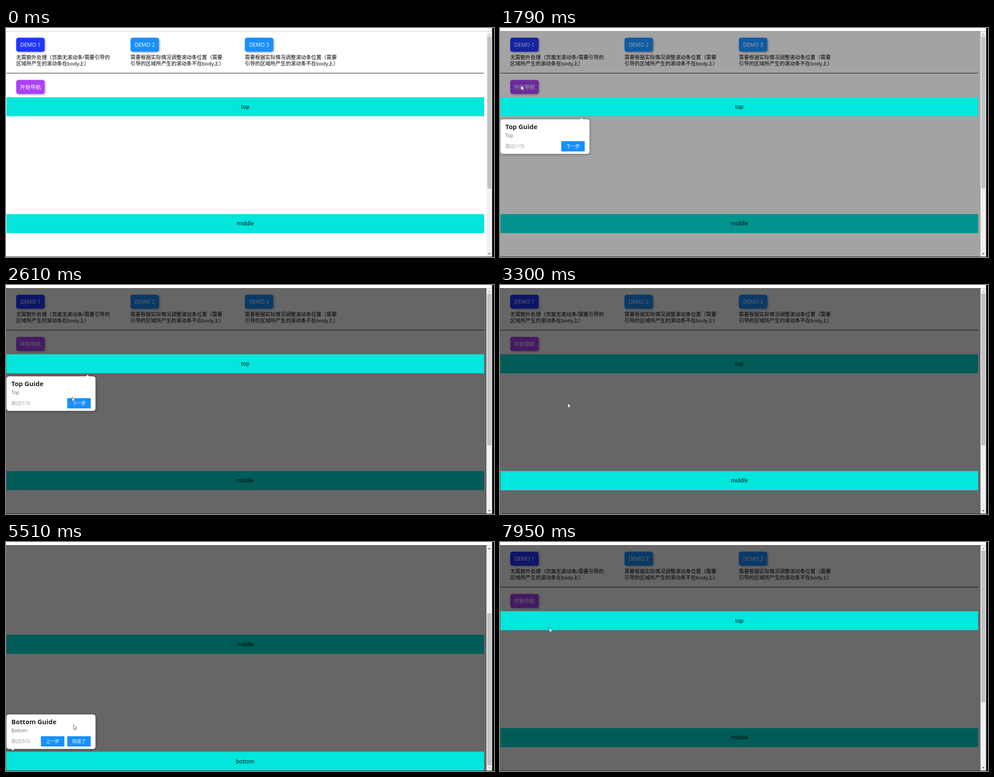
These frames come from a looping animation (1089x514 px, 8 s). An HTML page:

```html
<!DOCTYPE html>
<html lang="zh-CN">
<head>
<meta charset="utf-8">
<title>Guide demo</title>
<style>
  html, body { margin: 0; width: 100%; height: 100%; overflow: hidden; background: #fff; }
  svg { display: block; width: 100vw; height: 100vh; }
  text { font: 11.4px "Open Sans", "Noto Sans CJK SC", "Noto Sans CJK", sans-serif; white-space: pre; }
  .mid { text-anchor: middle; }
  .label { font-size: 11.8px; }
  .button { filter: drop-shadow(2px 2px 2px rgba(0, 0, 0, .3)); }
  .popup { filter: drop-shadow(0 1px 3px rgba(0, 0, 0, .4)); }
  .title { font-size: 14.5px; font-weight: 700; fill: #222; }
  .small { font-size: 10.2px; }
</style>
</head>
<body>
<svg id="stage" viewBox="0 0 1089 514"></svg>
<script>
const LOOP = 8000, SCROLL = 209.5, BAR_HEIGHT = 42.7, FADE_START = 1687;
const BLUE = '#1890ff';

const bars = [
  { name: 'top', y: 155.4 },
  { name: 'middle', y: 417.7 },
  { name: 'bottom', y: 680.3 }
];

// The counter reads 1 when a popup mounts and is corrected at `settle`.
const steps = [
  { at: FADE_START, show: FADE_START, settle: FADE_START, bar: 0, scroll: 0 },
  { at: 3300, show: 3630, settle: 3700, bar: 1, scroll: 0 },
  { at: 4840, show: 5170, settle: 5370, bar: 2, scroll: SCROLL },
  { at: 6260, show: 6590, settle: 6660, bar: 1, scroll: SCROLL },
  { at: 7730, show: Infinity, settle: Infinity, bar: 0, scroll: 0 }
];

// Cursor moves: start, end, x, y
const moves = [
  [70, 70, 673, 430], [130, 130, 462, 262], [330, 930, 47, 129],
  [1900, 2400, 144, 238], [2400, 2830, 151, 265], [3640, 4380, 165, 389],
  [5320, 5790, 125, 447], [6600, 7270, 99, 181], [7880, 7950, 110, 192]
];

// Time over a button, click time, release time
const presses = [
  [870, 1460, 1650], [2770, 3100, 3300], [4270, 4640, 4840],
  [5720, 6060, 6260], [7190, 7530, 7730]
];

const clamp = v => Math.max(0, Math.min(1, v));
const smooth = p => p * p * (3 - 2 * p);

// CSS "ease": cubic-bezier(.25, .1, .25, 1)
function ease(p) {
  let low = 0, high = 1;
  for (let i = 0; i < 20; i++) {
    const u = (low + high) / 2, v = 1 - u;
    if (.75 * v * v * u + .75 * v * u * u + u ** 3 < p) low = u; else high = u;
  }
  const v = 1 - low;
  return .3 * v * v * low + 3 * v * low * low + low ** 3;
}

const rect = (x, y, w, h, fill, extra = '') =>
  `<rect x="${x}" y="${y}" width="${w}" height="${h}" fill="${fill}" ${extra}/>`;
const text = (x, y, content, cls = '', fill = '#000') =>
  `<text x="${x}" y="${y}" class="${cls}" fill="${fill}">${content}</text>`;
const path = (d, fill, extra = '') => `<path d="${d}" fill="${fill}" ${extra}/>`;

const pageButton = (x, y, label, fill, opacity = 1) =>
  `<g opacity="${opacity}">` + rect(x, y, 63.5, 31.5, fill, 'rx="5" class="button"') +
  text(x + 31.8, y + 20.2, label, 'mid label', '#fff') + '</g>';

function page(scroll, hover) {
  const detail = ['需要根据实际情况调整滚动条位置（需要', '引导的区域所产生的滚动条不在body上）'];
  const demos = [
    [22.7, '#2136ff', '无需额外处理（页面无滚动条/需要引导的', '区域所产生的滚动条在body上）'],
    [277.8, BLUE, ...detail],
    [533, BLUE, ...detail]
  ];
  return `<g transform="translate(0 ${-scroll})">` +
    demos.map(([x, fill, first, second], i) =>
      pageButton(x, 21.8, 'DEMO ' + (i + 1), fill) +
      text(x, 69.5, first) + text(x, 84, second)).join('') +
    rect(1, 100.8, 1066, 1.2, '#333') +
    pageButton(22.7, 116.6, '开始导航', '#aa42f5', hover ? .85 : 1) +
    bars.map(({ name, y }) =>
      rect(1, y, 1066, BAR_HEIGHT, '#02e6dc') +
      text(534, y + 25.7, name, 'mid label')).join('') +
    '</g>';
}

function overlay(y, alpha) {
  const hole = `M1 ${y}h1066v${BAR_HEIGHT}h-1066z`;
  return path('M0 7h1072.5v507h-1072.5z' + hole, '#000', `fill-rule="evenodd" opacity="${alpha}"`);
}

function popup(step, t) {
  const { name, y: barY } = bars[step.bar];
  const label = name[0].toUpperCase() + name.slice(1);
  const first = step.bar === 0;
  const y = first ? 205 : barY - step.scroll - 83.8;
  const arrow = first ? 'M177.5 1l4.5-4.5 4.5 4.5z' : 'M10.5 76.5l4.5 4.5 4.5-4.5z';
  const count = t < step.settle ? 1 : step.bar + 1;
  const action = (x, caption) =>
    rect(x, 49, 52.5, 23, BLUE, 'rx="1.5"') + text(x + 26.2, 64.2, caption, 'mid small', '#fff');
  return `<g transform="translate(0 ${y})"><g class="popup">` +
    rect(1, 0, 198.7, 77.5, '#fff', 'rx="5.5"') + path(arrow, '#fff') + '</g>' +
    text(12, 21.5, label + ' Guide', 'title', '#222') +
    text(12, 39.5, label, 'small', '#666') +
    text(12, 64.2, `跳过(${count}/3)`, 'small', '#999') +
    (first ? '' : action(77.8, '上一步')) +
    action(136.6, step.bar === 2 ? '知道了' : '下一步') + '</g>';
}

function chrome(scroll) {
  const thumbY = scroll ? 160.5 : 19.5;
  const arrowFill = active => active ? '#505050' : '#a8a8a8';
  return rect(0, 0, 1085, 7, '#fff') +
    rect(1072.5, 8, 12, 505, '#f1f1f1') +
    rect(1074, thumbY, 9, 340.5, '#c1c1c1') +
    path('M1075.5 16l3-3 3 3z', arrowFill(scroll)) +
    path('M1075.5 505.5l3 3 3-3z', arrowFill(!scroll)) +
    rect(1084.7, 0, 4.3, 514, '#0a0a0a') +
    rect(0, 513, 1089, 1, '#222');
}

function cursor(t) {
  if (t < moves[0][0]) return '';
  let [, , x, y] = moves[0];
  for (const [start, end, toX, toY] of moves) {
    if (t < start) break;
    const p = end > start ? smooth(clamp((t - start) / (end - start))) : 1;
    x += (toX - x) * p;
    y += (toY - y) * p;
  }
  const press = presses.find(([over, , release]) => t >= over && t < release);
  const ring = press && t >= press[1]
    ? '<circle cx=".2" cy=".3" r="8.7" fill="#f0d800" opacity=".6"/>' : '';
  const shape = press
    ? 'M-1.3 1.3q0-1.2 1.2-1.2t1.2 1.2v4l4 .9q1.6.4 1.6 2v2.3l-1.2 3.3h-5.9l-3.3-4.8q-.6-1.5 1-1.5l1.4 1.2z'
    : 'M0 0v10.6l2.4-2.2 1.8 3.9 1.7-.8-1.7-3.7h3.3z';
  return `<g transform="translate(${x} ${y})">` + ring +
    path(shape, '#fff', 'stroke="#222" stroke-width=".7" stroke-linejoin="round"') + '</g>';
}

function scene(t) {
  const step = steps.filter(s => t >= s.at).pop();
  const scroll = step ? step.scroll : 0;
  const alpha = .6 * ease(clamp((t - FADE_START) / 300));
  return rect(0, 0, 1089, 514, '#fff') +
    page(scroll, t >= 870 && t < FADE_START) +
    rect(0, 7, 1085, 1, '#c8c8c8') +
    (step ? overlay(bars[step.bar].y - scroll, alpha) : '') +
    chrome(scroll) +
    (step && t >= step.show ? popup(step, t) : '') +
    cursor(t);
}

const stage = document.getElementById('stage');
const startTime = performance.now();
function draw() {
  stage.innerHTML = scene((performance.now() - startTime) % LOOP);
  requestAnimationFrame(draw);
}
draw();
</script>
</body>
</html>
```
